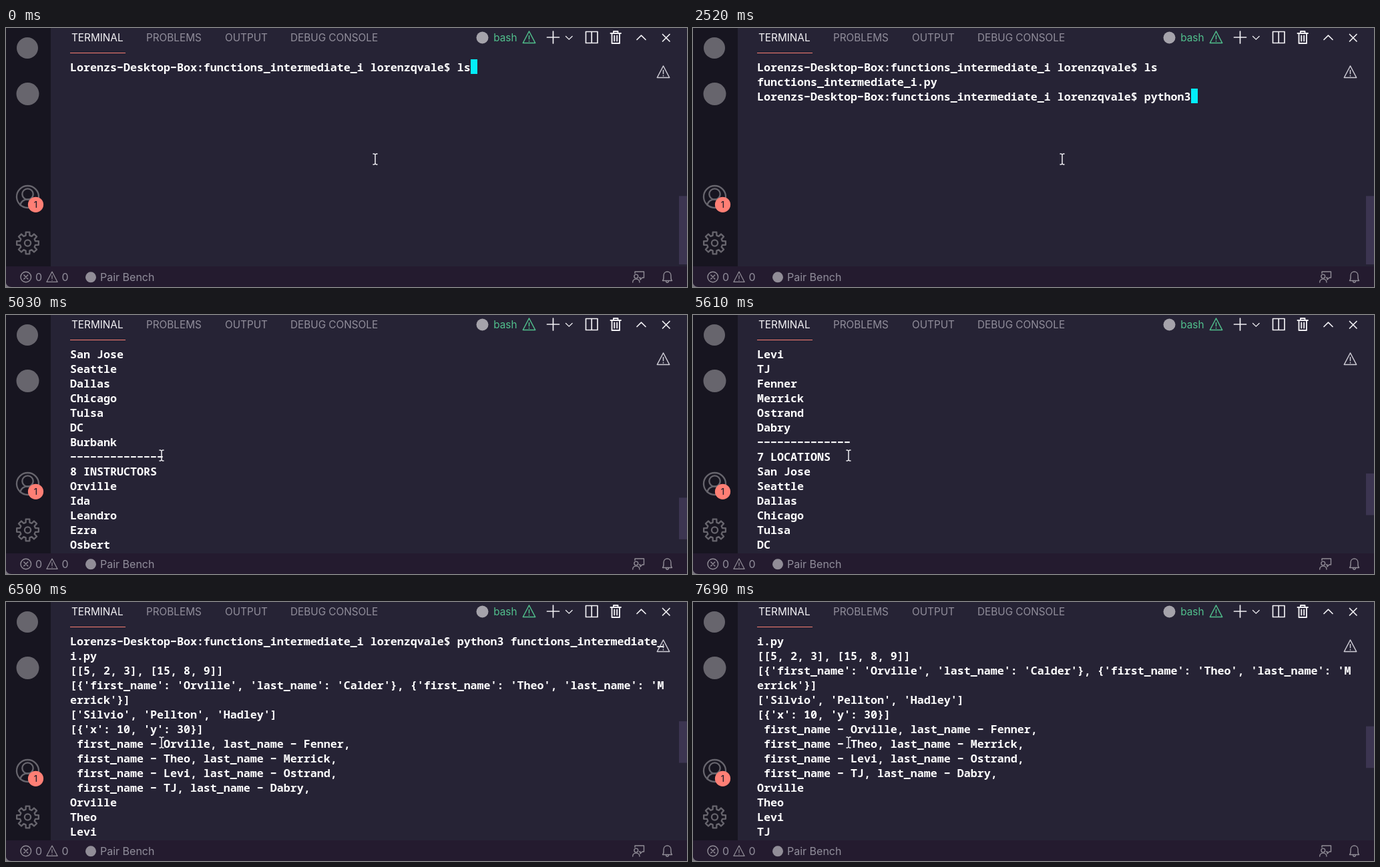
Recreate the animation shown at these times as an HTML page. Size 1020 by 389 pixels, loop 8 s.

```html
<!DOCTYPE html>
<html lang="en">
<head>
<meta charset="utf-8">
<title>Terminal session</title>
<style>
  html, body { margin: 0; width: 100%; height: 100%; overflow: hidden; background: #262335; }
  svg { display: block; width: 100%; height: 100%; }
  text { white-space: pre; }
  .ui { font: 15.3px Inter, "Open Sans", sans-serif; fill: #918e9b; }
  .status { font-size: 16px; }
  .active { fill: #f4f3f6; }
  .shell { fill: #51c08d; }
  .badge { font-size: 13px; font-weight: 500; fill: #25202c; }
  .term { font: 600 16.667px "Noto Sans Mono", "DejaVu Sans Mono", monospace; fill: #fff; font-variant-ligatures: none; }
  .line { fill: none; stroke-linecap: round; stroke-linejoin: round; }
</style>
</head>
<body>
<svg viewBox="0 0 1020 389">
  <defs>
    <g id="warn" class="line">
      <path d="M0 -9 L9.2 8.5 H-9.2 Z M0 -2.5 V2.8"/>
      <path d="M0 5.6 v.3"/>
    </g>
  </defs>

  <rect width="1020" height="389" fill="#262335"/>
  <rect width="67" height="358" fill="#171520"/>

  <!-- activity bar -->
  <g fill="#67656d">
    <circle cx="32" cy="30" r="16"/>
    <circle cx="32.5" cy="99" r="17"/>
  </g>
  <g class="line" stroke="#67656d" stroke-width="2.3">
    <circle cx="32.5" cy="253.5" r="16.5"/>
    <circle cx="32.5" cy="249.5" r="8.2"/>
    <path d="M21.5 266 C23 254.5 42 254.5 43.5 266"/>
    <path id="gear"/>
    <circle cx="32.5" cy="323" r="4.6"/>
  </g>
  <circle cx="44.5" cy="265.3" r="11.6" fill="#ff7f75"/>
  <text x="44.5" y="270" text-anchor="middle" class="ui badge">1</text>

  <!-- panel header -->
  <g class="ui">
    <text x="98" y="20" class="active">TERMINAL</text>
    <text x="210" y="20">PROBLEMS</text>
    <text x="328" y="20">OUTPUT</text>
    <text x="426" y="20">DEBUG CONSOLE</text>
    <text id="shell" x="765.5" y="20" text-anchor="end" class="shell">bash</text>
  </g>
  <rect x="96" y="37" width="83" height="1" fill="#f97e72"/>
  <circle id="shellIcon" cx="713.5" cy="14.5" r="9" fill="#a5a3ab"/>
  <use href="#warn" x="783.5" y="14" stroke="#51c08d" stroke-width="1.5"/>
  <g class="line" stroke="#f1f0f4" stroke-width="1.7">
    <path d="M810.5 14 h18 M819.5 5 v18"/>
    <path d="M838.5 12.5 l4.8 4.6 4.8 -4.6" stroke-width="1.3"/>
    <path d="M868.5 5.5 h17.5 v17 h-17.5 Z M877.2 5.5 v17"/>
    <path d="M905.5 8 h15.5 M910 7.5 v-2.5 h6.5 v2.5 M907.5 8.5 v14.5 h11.5 v-14.5 M911.3 11.5 v8 M915.2 11.5 v8" stroke-width="1.9"/>
    <path d="M945 17.5 l6.5 -6.4 6.5 6.4"/>
    <path d="M983.5 9.5 l10.5 10.5 m0 -10.5 l-10.5 10.5"/>
  </g>

  <!-- terminal -->
  <g id="rows" class="term"></g>
  <rect id="cursor" width="10" height="22" fill="#03edf9"/>
  <use href="#warn" x="984.5" y="66" stroke="#cfcdd6" stroke-width="1.5"/>
  <rect id="slider" x="1008" width="12" fill="#3c3551"/>

  <!-- status bar -->
  <rect y="358" width="1020" height="31" fill="#241b2f"/>
  <g class="line" stroke="#918d97" stroke-width="1.4">
    <circle cx="29.8" cy="374" r="7.8"/>
    <path d="M26.8 371 l6 6 m0 -6 l-6 6"/>
    <use href="#warn" transform="translate(69 374) scale(.88)"/>
    <path d="M942 368.5 V366 h13.5 v9 h-2.5 l-3 3 v-3 h-1.5"/>
    <circle cx="943.8" cy="373" r="2.9"/>
    <path d="M938.7 382 C939 375.5 948.6 375.5 949 382"/>
    <path d="M983.5 379.5 C985.5 377.5 985 375 985 372 C985 364 996 364 996 372 C996 375 995.5 377.5 997.5 379.5 Z M988.5 380 C988.8 383 992.2 383 992.5 380"/>
  </g>
  <circle cx="127" cy="374.3" r="8" fill="#918d97"/>
  <g class="ui status">
    <text x="44" y="380">0</text>
    <text x="83.5" y="380">0</text>
    <text x="141" y="380">Pair Bench</text>
  </g>
  <path d="M0 383 Q1 388.5 8 389 H0 Z" fill="#77737d"/>

  <!-- pointer -->
  <path id="pointer" class="line" stroke="#f1f0f4" stroke-width="1.5"
        d="M-3 -8 H-1.5 L0 -6.8 L1.5 -8 H3 M0 -6.8 V6.8 M-3 8 H-1.5 L0 6.8 L1.5 8 H3"/>
</svg>

<script>
const LOOP = 8000, COLS = 89, ROWS = 14, CELL = 10, LINE = 22, LEFT = 96, TOP = 47;
const HISTORY = 28; // scrollback lines above the first prompt
const $ = id => document.getElementById(id);

const prompt = 'Lorenzs-Desktop-Box:functions_intermediate_i lorenzqvale$ ';
const script = 'functions_intermediate_i.py';
const rule = '-'.repeat(14);
const output = `[[5, 2, 3], [15, 8, 9]]
[{'first_name': 'Orville', 'last_name': 'Calder'}, {'first_name': 'Theo', 'last_name': 'Merrick'}]
['Silvio', 'Pellton', 'Hadley']
[{'x': 10, 'y': 30}]
 first_name - Orville, last_name - Fenner,
 first_name - Theo, last_name - Merrick,
 first_name - Levi, last_name - Ostrand,
 first_name - TJ, last_name - Dabry,
Orville
Theo
Levi
TJ
Fenner
Merrick
Ostrand
Dabry
${rule}
7 LOCATIONS
San Jose
Seattle
Dallas
Chicago
Tulsa
DC
Burbank
${rule}
8 INSTRUCTORS
Orville
Ida
Leandro
Ezra
Osbert
Lambert
Tuan
Corin`.split('\n');

// [time, text after the second prompt]
const typing = [
  [290, ''], [1030, 'p'], [1180, 'py'], [1330, 'pyt'], [1480, 'pyth'],
  [1920, 'pytho'], [2070, 'python'], [2520, 'python3'], [2810, 'python3 '],
  [3110, 'python3 f'], [3260, 'python3 fu'], [3410, `python3 ${script} `]
];
const RUN = 4000, TICK = 147;
// [tick after the run, value]
const scroll = [[5, 27], [11, 14.8], [15, 3], [18, 0.9], [21, -0.2], [25, 3.3]];
const pointerX = [[2, 553], [5, 233]];
const pointerY = [[2, 197], [5, 211]];

function track(keys, at) {
  if (at <= keys[0][0]) return keys[0][1];
  for (let i = 1; i < keys.length; i++) {
    const [a, from] = keys[i - 1], [b, to] = keys[i];
    if (at <= b) return from + (to - from) * (at - a) / (b - a);
  }
  return keys[keys.length - 1][1];
}

const wrap = line => line.match(new RegExp(`.{1,${COLS}}`, 'g')) || [''];

function linesAt(t) {
  if (t < 140) return [prompt + 'ls'];
  if (t < 290) return [prompt + 'ls', ''];
  const head = [prompt + 'ls', script];
  const typed = typing.filter(([time]) => time <= t).pop()[1];
  const tail = t < RUN ? [] : [...output, prompt];
  return [...head, prompt + typed, ...tail].flatMap(wrap);
}

const rows = Array.from({ length: ROWS }, (_, i) => {
  const row = document.createElementNS('http://www.w3.org/2000/svg', 'text');
  row.setAttribute('x', LEFT);
  row.setAttribute('y', TOP + 18 + i * LINE);
  return $('rows').appendChild(row);
});

const set = (id, attrs) => {
  for (const name in attrs) $(id).setAttribute(name, attrs[name]);
};

function draw(t) {
  const ran = t >= RUN;
  const tick = ran ? Math.floor((t - RUN + 12) / TICK) : 0;
  const lines = linesAt(t);
  const offset = ran ? track(scroll, tick) : 0;
  const first = Math.max(0, Math.round(offset));

  rows.forEach((row, i) => {
    // the minus sign gives the terminal's long, high hyphen
    const text = (lines[first + i] || '').replace(/-/g, '\u2212');
    if (row.textContent !== text) row.textContent = text;
  });

  const last = lines.length - 1;
  const cursorRow = last - first;
  set('cursor', {
    x: LEFT + lines[last].length * CELL,
    y: TOP + cursorRow * LINE,
    visibility: cursorRow < ROWS ? 'visible' : 'hidden'
  });

  const total = HISTORY + Math.max(ROWS, lines.length);
  const height = ROWS * LINE;
  set('slider', {
    y: TOP + height * (HISTORY + offset) / total,
    height: height * ROWS / total
  });

  const python = ran && t < 4150;
  $('shell').textContent = python ? 'Python' : 'bash';
  set('shellIcon', { cx: python ? 697.5 : 713.5 });
  set('pointer', { transform: `translate(${track(pointerX, tick)} ${track(pointerY, tick)})` });
}

const gear = [];
for (let tooth = 0; tooth < 8; tooth++) {
  for (const [turn, radius] of [[-0.25, 11.8], [-0.17, 16.6], [0.17, 16.6], [0.25, 11.8]]) {
    const angle = tooth * Math.PI / 4 + turn;
    gear.push(`${32.5 + radius * Math.cos(angle)} ${323 + radius * Math.sin(angle)}`);
  }
}
set('gear', { d: `M${gear.join('L')}Z` });

const start = performance.now();
function frame() {
  draw((performance.now() - start) % LOOP);
  requestAnimationFrame(frame);
}
frame();
</script>
</body>
</html>
```
